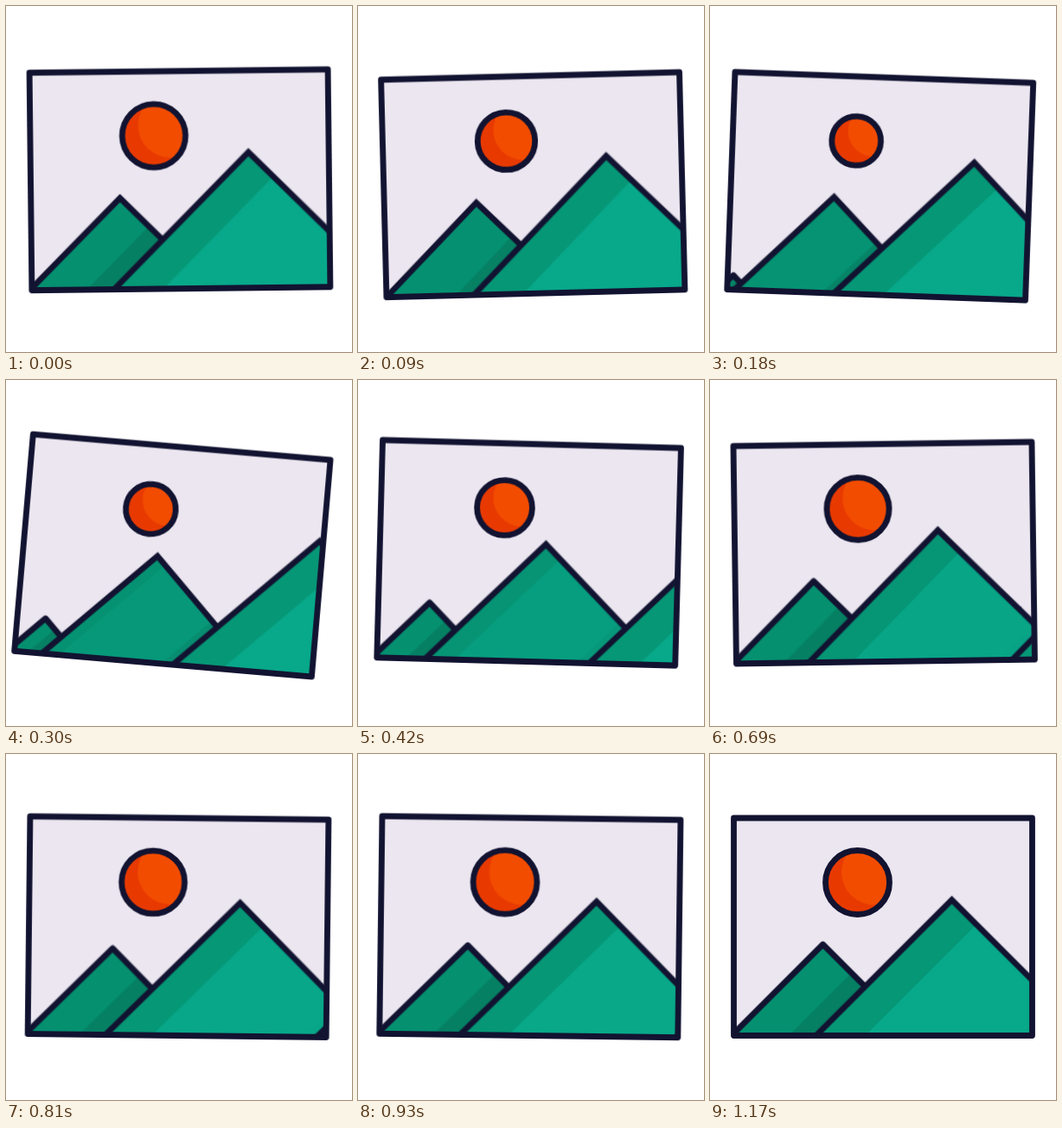
These frames come from a looping animation (400 by 400 pixels, 1200 ms). An HTML page:

```html
<!DOCTYPE html>
<html lang="en">
<head>
<meta charset="utf-8">
<title>Landscape</title>
<style>
  html, body { margin: 0; width: 100%; height: 100%; overflow: hidden; background: #fff; }
  svg { display: block; width: 100vw; height: 100vh; }

  .line { fill: none; stroke: #121331; stroke-width: 6.8; stroke-linejoin: round; }
  .sharp { stroke-linejoin: miter; }

  .bob, .tilt, .disc, .glow { animation: 1200ms cubic-bezier(.37, 0, .63, 1) infinite; }
  .bob { animation-name: bob; }
  .tilt { animation-name: tilt; transform-origin: 200px 111px; }
  .disc { animation-name: disc; }
  .glow { animation-name: glow; }

  /* Mountains and their shading share one glide */
  .slide {
    animation: slide 1200ms cubic-bezier(.33, 0, .2, 1) infinite;
    transform: translate(var(--from));
  }
  .tint { animation: tint 1200ms cubic-bezier(.33, 0, .2, 1) infinite; }
  .settle { animation: settle 1200ms linear infinite; }

  @keyframes slide {
    0% { transform: translate(var(--x0), var(--y0)); }
    95%, 100% { transform: translate(var(--x1), var(--y1)); }
  }
  @keyframes tint {
    0% { fill: var(--c0); }
    95%, 100% { fill: var(--c1); }
  }
  @keyframes settle {
    0% { transform: translate(-9px, -9px); }
    13%, 100% { transform: none; }
  }
  @keyframes bob {
    0% { transform: translateY(1.2px); }
    11.67% { transform: translateY(9px); }
    35%, 100% { transform: translateY(0); }
  }
  @keyframes tilt {
    0% { transform: rotate(-.6deg); animation-timing-function: ease-out; }
    4.58% { transform: rotate(-1.85deg); }
    23.75% { transform: rotate(5deg); }
    46.25% { transform: rotate(-1.85deg); }
    72.5% { transform: rotate(.85deg); }
    92.5%, 100% { transform: rotate(0deg); }
  }
  @keyframes disc {
    0% { r: 36.6px; }
    17.5% { r: 28px; }
    53.3% { r: 36px; }
    83%, 100% { r: 37px; }
  }
  @keyframes glow {
    0% { r: 37.6px; }
    17.5% { r: 29px; }
    53.3% { r: 37px; }
    83%, 100% { r: 38px; }
  }

  .near { --x0: 279.5px; --y0: 168.5px; --x1: 532px; --y1: 168.5px; }
  .mid { --x0: 130.5px; --y0: 220px; --x1: 279.5px; --y1: 168.5px; }
  .far { --x0: 22px; --y0: 320px; --x1: 130.5px; --y1: 220px; }
  .mid .face { --x0: 0px; --y0: 0px; --x1: 28.5px; --y1: 28.5px; --c0: #059070; --c1: #08a88a; }
  .mid .strip { --c0: #059070; --c1: #069776; }
  .mid .shade { --x0: 42px; --y0: 42px; --x1: 119px; --y1: 119px; --c0: #068063; --c1: #08a88a; }
  .far .shade { --x0: 0px; --y0: 0px; --x1: 33px; --y1: 33px; }
</style>
</head>
<body>
<svg viewBox="0 0 400 400">
  <defs>
    <path id="wedge" d="M-400 400L0 0L400 400"/>
    <clipPath id="pane"><rect x="27.5" y="74" width="345" height="251.5"/></clipPath>
    <clipPath id="ball"><circle class="disc" cx="170.5" cy="148.5" r="37"/></clipPath>
  </defs>

  <g class="bob"><g class="tilt">
    <rect x="27.5" y="74" width="345" height="251.5" fill="#ebe6ef"/>

    <g clip-path="url(#ball)">
      <rect x="130" y="108" width="81" height="81" fill="#e83a00"/>
      <circle class="glow" cx="190" cy="136.5" r="38" fill="#f24c00"/>
    </g>
    <circle class="line disc" cx="170.5" cy="148.5" r="37"/>

    <g clip-path="url(#pane)">
      <g class="slide far">
        <use href="#wedge" fill="#059070"/>
        <use href="#wedge" class="slide shade" fill="#068063"/>
        <use href="#wedge" class="line"/>
      </g>
      <g class="slide mid">
        <use href="#wedge" class="strip tint"/>
        <g class="slide face"><use href="#wedge" class="tint"/></g>
        <g class="settle"><g class="slide shade"><use href="#wedge" class="tint"/></g></g>
        <use href="#wedge" class="line sharp"/>
      </g>
      <g class="slide near">
        <use href="#wedge" fill="#069776"/>
        <use href="#wedge" transform="translate(28.5 28.5)" fill="#08a88a"/>
        <use href="#wedge" class="line sharp"/>
      </g>
    </g>

    <rect class="line" x="27.5" y="74" width="345" height="251.5"/>
  </g></g>
</svg>
</body>
</html>
```
